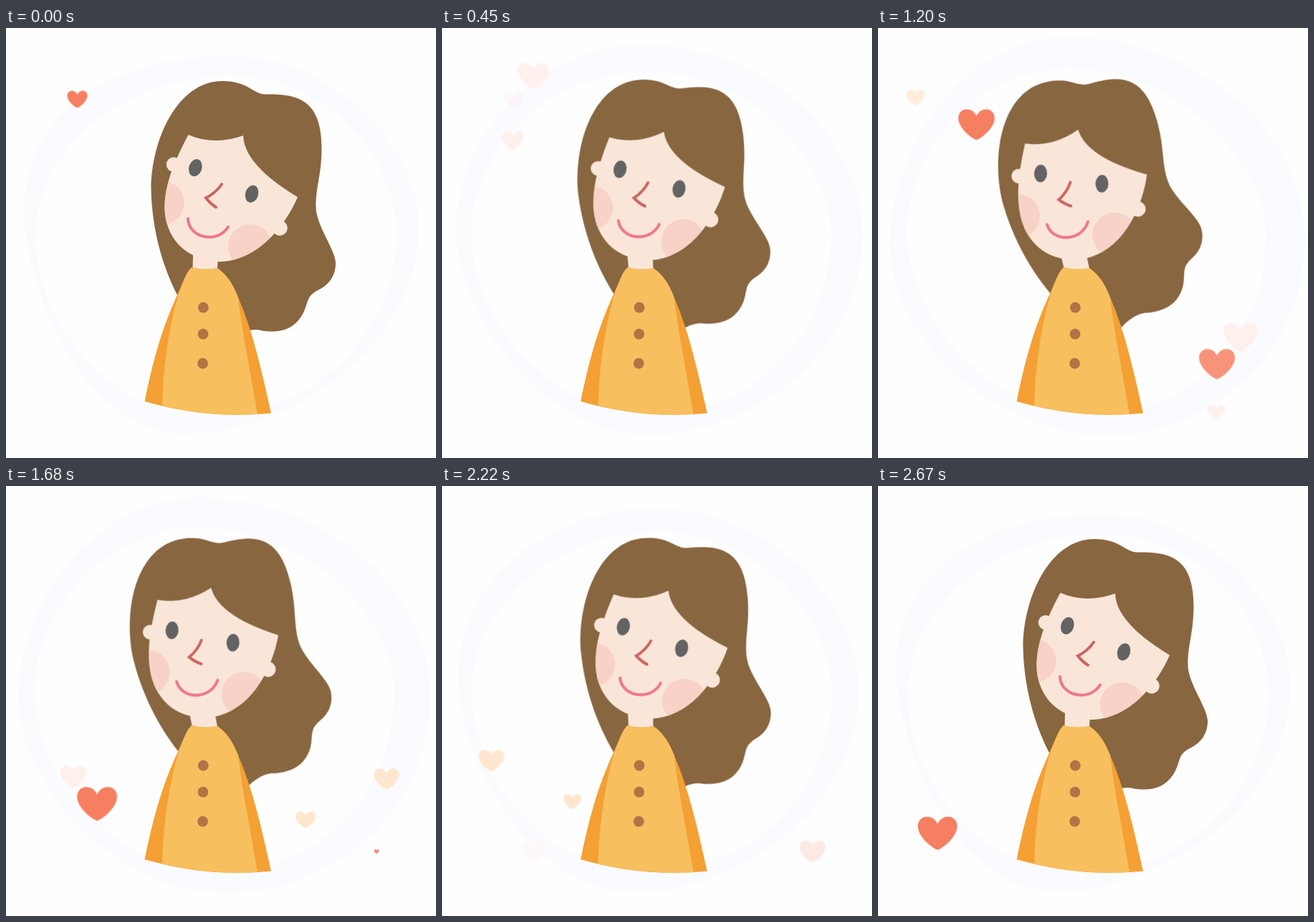
Animation of 600x600 px, one loop 2700 ms. Source, as an HTML page without scripts:

```html
<!DOCTYPE html>
<html lang="en">
<head>
<meta charset="utf-8">
<title>Girl with hearts</title>
<style>
  html, body { margin: 0; width: 100%; height: 100%; overflow: hidden; background: #fefefe; }
  svg { display: block; width: 100%; height: 100%; }

  .sway { animation: sway 2.7s infinite; transform-origin: 275px 337px; }
  .outer { animation: outer 2.7s infinite; fill: #fafbff; }
  .inner { animation: inner 2.7s infinite; fill: #fefefe; }

  @keyframes sway {
    0% { transform: rotate(0deg); animation-timing-function: cubic-bezier(.333, .333, .667, 1); }
    50% { transform: rotate(-15.8deg); animation-timing-function: cubic-bezier(.333, 0, .667, 1); }
    100% { transform: rotate(0deg); }
  }
  @keyframes outer {
    0%, 100% { d: path("M25 255C25 110 160 39 310 39C460 39 576 165 576 280C576 440 400 566 250 566C100 566 25 350 25 255Z"); }
    0% { animation-timing-function: cubic-bezier(.333, .2, .667, 1); }
    50% {
      d: path("M16 300C16 180 110 12 265 12C430 12 595 130 595 295C595 470 450 569 320 569C170 569 16 440 16 300Z");
      animation-timing-function: cubic-bezier(.333, 0, .667, 1);
    }
  }
  @keyframes inner {
    0%, 100% { d: path("M42 290C42 170 160 68 315 68C450 68 545 180 545 290C545 420 430 540 290 540C130 540 42 400 42 290Z"); }
    0% { animation-timing-function: cubic-bezier(.333, .2, .667, 1); }
    50% {
      d: path("M40 285C40 180 130 57 265 57C420 57 541 190 541 290C541 430 440 538 300 538C150 538 40 400 40 285Z");
      animation-timing-function: cubic-bezier(.333, 0, .667, 1);
    }
  }

  /* --t: start of a burst, --s: start of a heart within it */
  .burst use {
    animation: pop 2.7s linear infinite;
    animation-delay: calc(var(--t) + var(--s) - 2820ms);
  }
  @keyframes pop {
    0% { transform: scale(0); opacity: 1; animation-timing-function: cubic-bezier(.333, .667, .667, 1); }
    13.5% { transform: scale(1); opacity: 1; }
    17.5% { transform: scale(.9); opacity: 1; }
    18.9% { transform: scale(.85); opacity: .85; }
    20% { transform: scale(.78); opacity: .6; }
    20.7% { transform: scale(.63); opacity: .2; }
    21.3%, 100% { transform: scale(.5); opacity: 0; }
  }
  .burst use:nth-child(1) { --s: 0ms; scale: 1.157; }
  .burst use:nth-child(2) { --s: 245ms; translate: 33px -37.5px; }
  .burst use:nth-child(3) { --s: 410ms; translate: -1px 67px; }
  .burst use:nth-child(4) { --s: 590ms; translate: 58px -60px; scale: .706; }
  .burst use:nth-child(5) { --s: 800ms; translate: -55px -3px; scale: .706; }
  .burst use:nth-child(6) { --s: 970ms; translate: 44px 41px; scale: 1.157; }
  .red { fill: #f67f62; }
  .pink { fill: #fff0ee; }
  .peach { fill: #ffe7cf; }

  /* bursts are cut off where the loop restarts */
  .first { --t: 0ms; animation: first 2.7s step-end infinite; }
  .second { --t: 810ms; }
  .third { --t: 1380ms; animation: third 2.7s step-end infinite; }
  @keyframes first { 0% { opacity: 1; } 95%, 100% { opacity: 0; } }
  @keyframes third { 0% { opacity: 0; } 46%, 100% { opacity: 1; } }
</style>
</head>
<body>
<svg viewBox="0 0 600 600">
  <defs>
    <path id="heart" d="M0 21.5C-8 19-25.5 4-25.5-9C-25.5-24-6-26 0-12C6-26 25.5-24 25.5-9C25.5 4 8 19 0 21.5Z"/>
    <path id="face" d="M254.5 149Q291 164.5 331 150C332 183 369 213 407 236C387 282 346 327 295.5 326L294 350H260L261 317C236 305 221.5 279 221.5 251C221.5 215 238 180 254.5 149Z"/>
    <clipPath id="faceClip"><use href="#face"/></clipPath>
  </defs>

  <path class="outer" d="M25 255C25 110 160 39 310 39C460 39 576 165 576 280C576 440 400 566 250 566C100 566 25 350 25 255Z"/>
  <path class="inner" d="M42 290C42 170 160 68 315 68C450 68 545 180 545 290C545 420 430 540 290 540C130 540 42 400 42 290Z"/>

  <g class="first">
    <g class="burst" transform="translate(99.5 99.5) scale(.86)">
      <use href="#heart" class="red"/>
      <use href="#heart" class="pink"/>
      <use href="#heart" class="pink"/>
      <use href="#heart" class="peach"/>
      <use href="#heart" class="peach"/>
      <use href="#heart" class="red"/>
    </g>
  </g>
  <g class="second">
    <g class="burst" transform="translate(473 469)">
      <use href="#heart" class="red"/>
      <use href="#heart" class="pink"/>
      <use href="#heart" class="pink"/>
      <use href="#heart" class="peach"/>
      <use href="#heart" class="peach"/>
      <use href="#heart" class="red"/>
    </g>
  </g>
  <g class="third">
    <g class="burst" transform="translate(127 443.5) scale(-1 1)">
      <use href="#heart" class="red"/>
      <use href="#heart" class="pink"/>
      <use href="#heart" class="pink"/>
      <use href="#heart" class="peach"/>
      <use href="#heart" class="peach"/>
      <use href="#heart" class="red"/>
    </g>
  </g>

  <g class="sway">
    <path fill="#886640" d="M252 395C220 345 203.5 283 202.5 225C202.5 157 239 74 302 74C338 74 345 92.5 362 92.5C410 91 440.5 103 440.5 167C440.5 205 432 222 432.5 250C432.5 275 460 310 460 328C460 350 446 361 435 366C415 376 424 389 408 408C394 424 375 425 358 422.5C345 419 333 422 316 432L285 420Z"/>
    <g fill="#f9e6d9">
      <circle cx="234" cy="190.5" r="10.2"/>
      <circle cx="382" cy="279" r="10.7"/>
      <use href="#face"/>
    </g>
    <g fill="#f8d2c7" clip-path="url(#faceClip)">
      <circle cx="218" cy="244" r="30.7"/>
      <circle cx="341" cy="305" r="31"/>
    </g>
    <g fill="#636363">
      <ellipse rx="9" ry="12.2" transform="translate(264.3 195) rotate(17)"/>
      <ellipse rx="9" ry="12.2" transform="translate(343 231.5) rotate(17)"/>
    </g>
    <g fill="none" stroke-width="4" stroke-linecap="round">
      <path stroke="#cb645f" d="M301 218Q293 230 279 237Q285 245 293 250"/>
      <path stroke="#ed768c" d="M254 266C254.5 293 295 302 310 277.5"/>
    </g>
  </g>

  <path fill="#f4a034" d="M259 334Q277 339 295 335C311 346 319 363 324 376C345 424 357 480 370 537.5Q280 546.5 193.5 521C204 470 215.5 423 240.3 369.5C247 355 252 340 259 334Z"/>
  <path fill="#f7bf5e" d="M259 334Q277 339 295 335C311 346 319 363 324 376C329 420 341 480 351 538.7Q285 543 218 527.5C219 470 229 410 241 370C247 355 252 340 259 334Z"/>
  <g fill="#b17445">
    <circle cx="275.3" cy="390" r="7.4"/>
    <circle cx="275" cy="427" r="7.4"/>
    <circle cx="274.5" cy="468" r="7.4"/>
  </g>
</svg>
</body>
</html>
```
